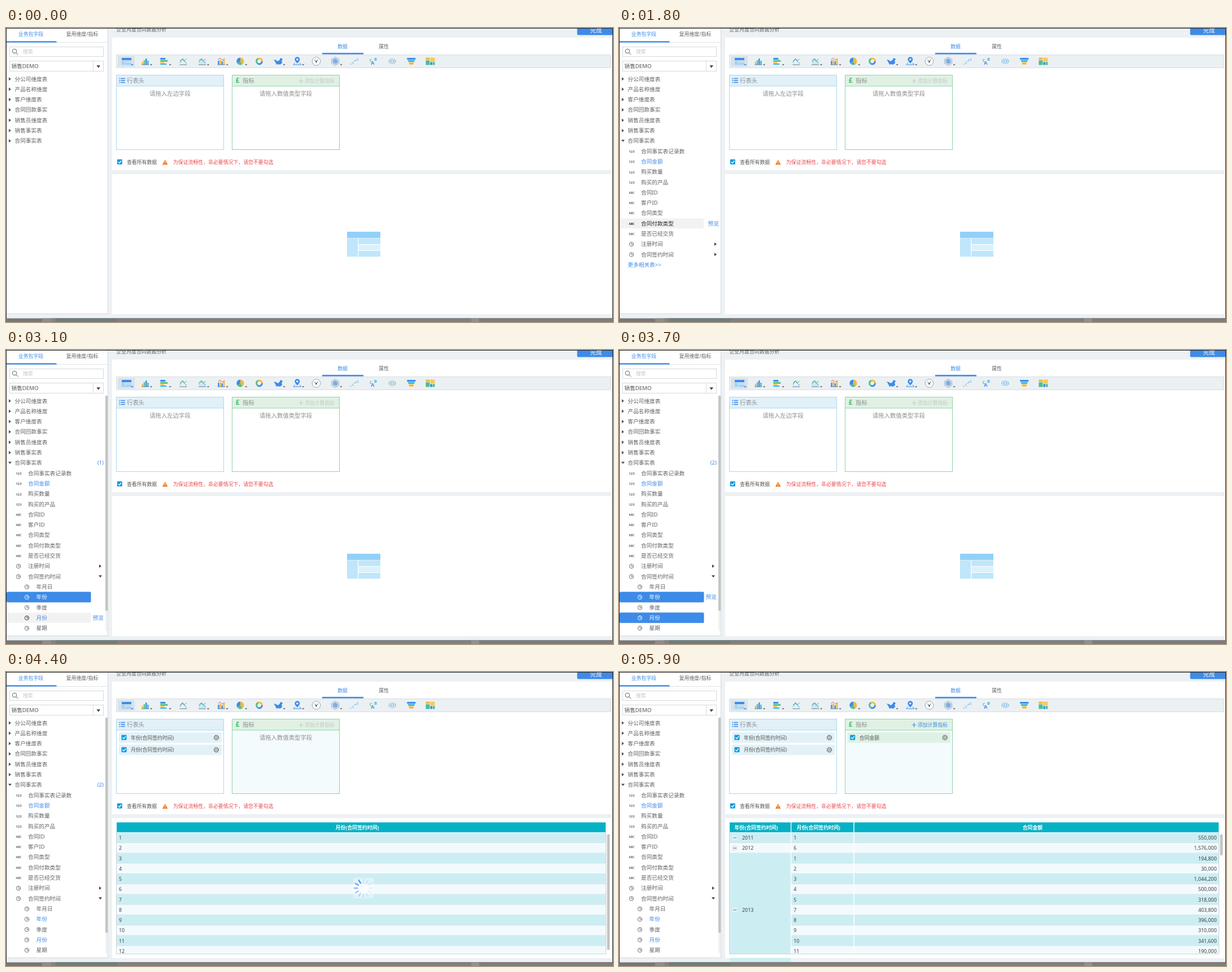
An HTML page for the animation above (7700 ms loop, 1075 by 521 pixels).

```html
<!DOCTYPE html>
<html>
<head>
<meta charset="utf-8">
<title>Report builder</title>
<style>
html, body { margin: 0; width: 100%; height: 100%; overflow: hidden; background: #edf1f4; }
svg { display: block; width: 100%; height: 100%; font-family: "Noto Sans", "Noto Sans CJK SC", sans-serif; }
text { white-space: pre; }
</style>
</head>
<body>
<svg id="stage" viewBox="0 0 1075 521">
  <g id="base"></g>
  <g id="live"></g>
  <g id="edge"></g>
</svg>
<script>
const LOOP = 7700, STEP = 100;
const BLUE = '#3d8be8', GREY = '#606266', DARK = '#262626', TEAL = '#05b1c5';
const SMALL = 8.9, MID = 9.66, BIG = 10.4;

// Drawing helpers: each returns SVG markup; text is centred vertically on y.
const rect = (x, y, w, h, fill, extra = '') =>
  `<rect x="${x}" y="${y}" width="${w}" height="${h}" fill="${fill}" ${extra}/>`;
const frame = (x, y, w, h, color, fill = 'none', extra = '') =>
  rect(x + .5, y + .5, w - 1, h - 1, fill, `stroke="${color}" ${extra}`);
const fillPath = (d, fill) => `<path d="${d}" fill="${fill}"/>`;
const line = (d, color, w = 1, extra = '') =>
  `<path d="${d}" fill="none" stroke="${color}" stroke-width="${w}" ${extra}/>`;
const disc = (x, y, r, fill, extra = '') => `<circle cx="${x}" cy="${y}" r="${r}" fill="${fill}" ${extra}/>`;
const text = (s, x, y, size, fill, anchor = 'start', weight = 400) =>
  `<text x="${x}" y="${y + size * .37}" font-size="${size}" fill="${fill}" text-anchor="${anchor}" font-weight="${weight}">${s}</text>`;
const move = (x, y, body) => `<g transform="translate(${x} ${y})">${body}</g>`;
const rightArrow = (x, y, c) => fillPath(`M${x - 2} ${y - 3}l4 3l-4 3z`, c);
const downArrow = (x, y, c) => fillPath(`M${x - 3} ${y - 2}h6l-3 4z`, c);
const check = (x, y) => rect(x - 4.5, y - 4.5, 9, 9, '#0a9be0', 'rx="1"') +
  line(`M${x - 2.5} ${y}l2 2.2l3.5 -4.3`, '#fff', 1.4);
const clock = (x, y, c) => disc(x, y, 3.7, 'none', `stroke="${c}" stroke-width=".9"`) +
  line(`M${x} ${y - 2.6}v2.8h2.8`, c, .9);
const gear = (x, y) => disc(x, y, 4.1, 'none', 'stroke="#6d7377" stroke-width="1.3" stroke-dasharray="2.1 1.1"') +
  disc(x, y, 3.4, 'none', 'stroke="#6d7377" stroke-width=".8"') +
  disc(x, y, 1.5, 'none', 'stroke="#6d7377" stroke-width=".9"');

const bars = (hs, colors) => hs.map((h, i) => rect(-6 + i * 3.2, 6 - h, 2.4, h, colors[i % colors.length])).join('');
const wedge = (a, b, color) => {
  const p = k => `${6.5 * Math.cos(k)} ${6.5 * Math.sin(k)}`;
  return fillPath(`M0 0L${p(a)}A6.5 6.5 0 ${b - a > Math.PI ? 1 : 0} 1 ${p(b)}z`, color);
};
const hexagon = r => 'M' + [0, 1, 2, 3, 4, 5].map(i =>
  `${r * Math.sin(i * Math.PI / 3)} ${-r * Math.cos(i * Math.PI / 3)}`).join('L') + 'z';
const axis = line('M-6.5 6h13', '#5d7f9c');

function icons() {
  const GREEN = '#4fbf8b', YEL = '#f5b83d', CYAN = '#35b6e6';
  const ring = (c, from) => disc(0, 0, 4.9, 'none',
    `stroke="${c}" stroke-width="3" stroke-dasharray="10.3 20.5" stroke-dashoffset="${-from}"`);
  const dots = (n, c, f) => Array.from({ length: n }, (_, i) => disc(...f(i), .8, c)).join('');
  return [
    rect(-8, -6, 17, 4, BLUE) + rect(-8, -1.3, 5, 7.5, '#9fd3f6') + rect(-2.2, -1.3, 11.2, 3.3, '#b5def8') +
      rect(-2.2, 2.8, 11.2, 3.4, '#9fd3f6'),
    bars([5, 8, 11, 7], [YEL, GREEN, BLUE, CYAN]) + axis,
    rect(-7, -6, 9, 3, BLUE) + rect(-7, -2.2, 13, 3, GREEN) + rect(-7, 1.6, 7, 2, YEL) + rect(-7, 4, 11, 2, CYAN),
    line('M-6 3L-1 -5L2 -1L6 -4', GREEN) + line('M-6 0L-2 -4L3 1L6 4', BLUE) + axis,
    fillPath('M-6 6V2L-1 -5L2 -1L6 -4V6z', '#cfe9ee') + line('M-6 2L-1 -5L2 -1L6 -4', GREEN) +
      line('M-6 -1L-2 -4L3 1L6 3', BLUE) + axis,
    bars([7, 9, 6, 10], [BLUE, YEL]) + line('M-6 -3L-2 -6L2 -2L6 -5', '#e2605d') + axis,
    wedge(-1.57, 1, YEL) + wedge(1, 2.6, GREEN) + wedge(2.6, 4.71, BLUE),
    ring(BLUE, 0) + ring(GREEN, 10.3) + ring(YEL, 20.5),
    fillPath('M-8 -3L-4 -2L-1 0L2 -2L4 -6L8 -4L6 -1L7 3L3 6L0 5L-3 6L-5 2z', BLUE),
    fillPath('M0 4C-2 1 -4.5 -1 -4.5 -3.3A4.5 4.5 0 0 1 4.5 -3.3C4.5 -1 2 1 0 4z', BLUE) + disc(0, -3.2, 1.8, '#fff') +
      line('M-4 2.5L-7 6H7L4 2.5', BLUE),
    disc(0, 0, 7.3, '#fff', 'stroke="#9aa3a9"') + line('M-3 -3L0 1L3 -3', '#555', 1) + disc(0, 1, 1.4, '#555'),
    fillPath(hexagon(7.5), '#dbe6ee') + line(hexagon(7.5) + hexagon(4.8), '#8fa6b8', .8) +
      fillPath('M0 -5L4 -1L3 4L-3 3L-4 -2z', '#76aeea'),
    dots(4, BLUE, i => [-6 + i * 4.2, 5 - i * 3 + (i % 2) * 2]) + dots(4, CYAN, i => [-3 + i * 3, 2 - i * 2.2]),
    text('C', -4.5, -1.5, 7, GREEN, 'middle', 700) + text('A', -1, 3, 9, BLUE, 'middle', 700) + text('B', 4, -3.5, 7.5, CYAN, 'middle', 700),
    dots(12, '#45a9b0', i => [6 * Math.cos(i * .524), 4 * Math.sin(i * .524)]) +
      dots(6, BLUE, i => [3 * Math.cos(i * 1.05), 1.8 * Math.sin(i * 1.05)]),
    rect(-7.5, -6, 15, 3, BLUE) + fillPath('M-6.5 -2.2h13l-1.5 3.2h-10z', CYAN) + fillPath('M-4.5 1.8h9l-1 4h-7z', YEL),
    rect(-8, -6.5, 7, 4, YEL) + rect(-8, -1.7, 7, 8.2, GREEN) + rect(0, -6.5, 8, 7, '#f7c95b') + rect(0, 1.3, 3.5, 5.2, BLUE) +
      rect(4.3, 1.3, 3.7, 5.2, GREEN)
  ].map((body, i) => move(213 + 33.65 * i, 59, body) +
    ([0, 1, 2, 4, 5, 6, 8, 9, 11].includes(i) ? fillPath(`M${221.2 + 33.65 * i} 64h4.4l-2.2 2.8z`, i ? '#777' : BLUE) : '')).join('');
}

function drawBase() {
  return rect(0, 0, 1075, 521, '#edf1f4') +
    rect(0, 0, 180, 506, '#fff') + line('M180.5 0V506.5H0', '#d5d9dd') +
    text('业务包字段', 44, 11, SMALL, BLUE, 'middle') + text('复用维度/指标', 135, 11, SMALL, GREY, 'middle') +
    line('M0 25.5H180', '#dfe3e6') + rect(0, 23.3, 89.5, 2.4, BLUE) +
    frame(6, 33, 167, 18, '#d5d8db', '#fff') + disc(15, 41, 3.8, 'none', 'stroke="#666"') + line('M17.8 43.8l3.6 3.6', '#666') +
    text('搜索', 30, 42, SMALL, '#c4c6c8') +
    frame(6, 58, 167, 19, '#d5d8db', '#fff') + line('M154.5 58V77', '#d5d8db') +
    text('销售DEMO', 9.5, 67.7, MID, '#555') + fillPath('M160.3 66.2h6.8l-3.4 4.6z', '#444') +
    text('企业月度合同数据分析', 195.5, 3, SMALL, GREY) +
    rect(1011.5, -5, 70, 17.5, BLUE, 'rx="2"') + text('完成', 1045, 4, BIG, '#fff', 'middle') +
    rect(188, 17, 885, 235, '#fff') + rect(188, 259, 885, 248, '#fff') +
    text('数据', 596, 32.5, SMALL, BLUE, 'middle') + text('属性', 669, 32.5, SMALL, GREY, 'middle') +
    rect(560, 44, 73, 2.6, BLUE) +
    frame(195, 47, 876, 24, '#d6dee3', '#ebf0f3') + rect(198, 49.5, 30, 19, '#d9e2e7') + icons() +
    frame(195, 83, 191, 133, '#a9d8ee', '#fff') + rect(196, 84, 189, 19, '#e2f0f8') + line('M195 103H386', '#a9d8ee') +
    [-3.5, 0, 3.5].map(d => rect(200.5, 92.2 + d, 1.8, 1.7, BLUE) + rect(203.5, 92.2 + d, 7.3, 1.6, BLUE)).join('') +
    text('行表头', 214, 93, BIG, '#8a8f93') +
    check(201.3, 237.3) + text('查看所有数据', 214, 237.5, SMALL, '#555') +
    fillPath('M281.7 233.5L286.6 242.3H276.8z', '#f07c1a') + rect(281.2, 236.5, 1, 3, '#fff') + rect(281.2, 240.2, 1, 1, '#fff') +
    text('为保证流畅性，非必要情况下，请您不要勾选', 296, 237.5, SMALL, '#ea4b50');
}

function drawEdge() {
  const parts = [[0, '#777'], [64, '#8d8d8d'], [80, '#878182'], [88, '#6f7d7d'], [197, '#808080'], [824, '#919191'], [838, '#7d7d7d']];
  return parts.map(([x, c]) => rect(x, 514.5, 1075 - x, 7, c)).join('') +
    rect(0, 0, 1075, 1, '#222') + rect(0, 0, 1, 515, '#222') + rect(1074, 0, 1, 515, '#222');
}

// Timelines: the last entry at or before t holds.
const at = (list, t) => list.reduce((v, [from, x]) => t >= from ? x : v, undefined);
const HOVER = [[0, -1], [800, 6], [1400, 7], [1500, 10], [1600, 12], [1700, 13], [1800, 14], [1900, 16], [2000, 17],
  [2600, 18], [2700, 19], [3100, 21], [3600, 20], [3700, 19], [4000, -1], [4700, 8], [5100, -1]];
const COUNT = [[0, ''], [2900, '(1)'], [3400, '(2)'], [4500, ''], [5100, '(1)'], [5800, '']];
const DRAG_ROWS = [[4000, [95, 425]], [4100, [225, 290]], [4200, [343, 162]], [4300, [337, 150]]];
const DRAG_SUM = [[5100, [150, 232]], [5200, [388, 214]], [5300, [444, 190]], [5400, [449, 178]], [5500, [454, 166]],
  [5600, [457, 153]], [5700, [458, 147]]];
const SELECTED = { 8: [5100, 5800], 19: [2900, 4400], 21: [3400, 4400] };

const TABLES = ['分公司维度表', '产品名称维度', '客户维度表', '合同回款事实', '销售员维度表', '销售事实表', '合同事实表'];
const FIELDS = ['合同事实表记录数', '合同金额', '购买数量', '购买的产品', '合同ID', '客户ID', '合同类型', '合同付款类型',
  '是否已经交货', '注册时间', '合同签约时间'];
const PARTS = ['年月日', '年份', '季度', '月份', '星期'];
const rowY = i => 90.2 + 18.3 * i;

function tooltip(s, x, y, w) {
  return rect(x, y, w, 15.5, '#fdf6d3', 'rx="2"') + text(s, x + 9, y + 7.5, SMALL, '#777');
}

function tree(t) {
  const open = t >= 1200, deep = t >= 2300, hover = at(HOVER, t);
  const right = deep ? 176 : 180;
  const rows = [...TABLES, ...(open ? FIELDS : []), ...(deep ? PARTS : [])];
  let out = '';
  rows.forEach((label, i) => {
    const y = rowY(i), hot = i === hover, span = SELECTED[i];
    const picked = span && t >= span[0] && t < span[1];
    const wide = i < 7 || i === 16 || i === 17;
    const ink = picked ? '#fff' : hot ? DARK : GREY;
    if (picked) out += rect(1, y - 9.3, 149.5, 18.6, BLUE, 'rx="2"');
    else if (hot) out += rect(1, y - 9, wide ? right - 1 : 149, 18, '#f2f2f2');
    if (hot && !wide) out += text('预览', deep ? 153.5 : 157.5, y - .3, MID, BLUE);
    if (i < 7) out += (i === 6 && open ? downArrow : rightArrow)(7, y, hot ? '#111' : '#555');
    else if (i < 11) out += text('123', 22.5, y + .5, 5.8, ink, 'middle', 700);
    else if (i < 16) out += text('ABC', 22.5, y + .3, 4.9, ink, 'middle', 700);
    else out += clock(i < 18 ? 22 : 37, y + .2, ink);
    if (i === 16 || i === 17) out += (i === 17 && deep ? downArrow : rightArrow)(deep ? 167 : 171, y, '#444');
    const linked = span && !picked;
    out += text(label, i < 7 ? 15.5 : i < 18 ? 39 : 53.5, y - .2, MID, linked ? BLUE : ink);
  });
  if (open && !deep) out += text('更多相关表&gt;&gt;', 15.5, rowY(18), MID, BLUE);
  if (deep) out += rect(176, 81, 4.3, 417, '#f1f1f1') + rect(176, 81, 4.3, 381, '#c4c4c4', 'rx="1"');
  out += text(at(COUNT, t), 173, rowY(6) - .2, MID, BLUE, 'end');
  if (t >= 1300 && t < 1500) out += tooltip('销售DEMO.合同事实表', 97, 212, 108);
  if (t >= 2400 && t < 2700) out += tooltip('销售DEMO.合同事实表.合同签约时间', 109, 414.7, 163);
  return out;
}

const chip = (label, x, y, fill) => rect(x, y - 9.3, 182, 18.6, fill, 'rx="2"') + check(x + 9, y - .3) +
  text(label, x + 21, y, SMALL, '#555') + gear(x + 172.5, y);
const slot = (x, color) => frame(x, 107, 183, 20, color, 'none', 'stroke-dasharray="2.5 1.5"');

function zones(t) {
  const done = t >= 5800, add = done ? BLUE : '#c3c9c5';
  let out = frame(400, 83, 191, 133, '#8fd3a8', t >= 4000 ? '#f4fbfd' : '#fff') + rect(401, 84, 189, 19, '#e0f1e4') +
    line('M400 103H591', '#8fd3a8') + text('£', 410, 93, 11.5, '#45bd72', 'middle', 700) + text('指标', 419, 93, BIG, '#8a8f8c') +
    line('M518.5 94h8M522.5 90v8', add, 1.2) + text('添加计算指标', 529, 93.3, SMALL, add);
  if (t < 4200) out += text('请拖入左边字段', 290.5, 116, BIG, '#8c8c8c', 'middle');
  else if (t < 4400) out += slot(199, '#7cc0e6');
  else out += chip('年份(合同签约时间)', 200, 116.3, '#e3f1f7') + chip('月份(合同签约时间)', 200, 138, '#e3f1f7');
  if (t < 5300) out += text('请拖入数值类型字段', 495.5, 116, BIG, '#8c8c8c', 'middle');
  else if (!done) out += slot(404, '#6cc88c');
  else out += chip('合同金额', 404.7, 116.3, '#dff1e4');
  return out;
}

const MONTHS = [1, 6, 1, 2, 3, 4, 5, 7, 8, 9, 10, 11];
const SUMS = [550000, 1576000, 194800, 30000, 1044200, 500000, 318000, 403800, 396000, 310000, 341600, 190000];
const commas = n => String(n).replace(/\B(?=(\d{3})+$)/g, ',');
const lineY = i => 284.7 + 18.25 * i;
const tone = i => i % 2 ? '#f3fafd' : '#cceef3';

function column(title, x, end, cells, alignRight) {
  let out = rect(x, 266.5, end - x, 17.5, TEAL) + text(title, (x + end) / 2 - 7, 275.3, SMALL, '#fff', 'middle', 700);
  cells.forEach((s, i) => {
    out += rect(x, lineY(i), end - x, 18.25, tone(i)) + rect(x, lineY(i + 1) - .7, end - x, .8, '#d3dadc') +
      text(s, alignRight ? end - 3.5 : x + 4, lineY(i) + 9.2, SMALL, '#404040', alignRight ? 'end' : 'start');
  });
  return out;
}

function years() {
  let out = column('年份(合同签约时间)', 196, 304, ['', '']) + rect(196, lineY(2), 108, 200, tone(0));
  [[2011, 0], [2012, 1], [2013, 7]].forEach(([year, i]) => {
    const y = lineY(i) + 9.2;
    out += rect(200.5, y - 4.5, 9, 9, '#e2eef0', 'rx="1.5"') + line(`M202.3 ${y}h5.6`, '#777') + text(year, 218, y, SMALL, '#404040');
  });
  return out;
}

function spinner(turn) {
  let out = '';
  for (let i = 0; i < 12; i++) {
    out += `<g transform="rotate(${(turn - i) * 30})" opacity="${Math.max(.12, 1 - i * .16)}">` +
      rect(-1, -17.3, 2, 8, BLUE, 'rx="1"') + '</g>';
  }
  return move(633, 383, rect(-18, -18, 36, 36, '#fff', 'opacity=".35"') + out);
}

function placeholder() {
  return rect(604, 361, 59, 11.3, '#93d0f8') + rect(604, 373, 19, 32.3, '#bfe6fb') + rect(624.3, 373, 38.7, 10, '#bfe6fb') +
    rect(624.3, 384, 38.7, 10, '#d9f2fd') + rect(624.3, 395, 38.7, 10.3, '#bfe6fb');
}

function table(t) {
  if (t < 4400) return placeholder();
  const loaded = t >= 4500;
  let out = '';
  if (!loaded) out += column('月份(合同签约时间)', 196, 1062, MONTHS.map((_, i) => i + 1));
  else {
    out += years() + column('月份(合同签约时间)', 305.3, t < 5900 ? 1062 : 415.3, MONTHS);
    if (t >= 5900) out += column('合同金额', 416.8, 1062, SUMS.map(commas), true);
  }
  out += rect(190, 500, 880, 6.5, '#fff') + line('M195.5 284V499.7H1062.5V284', '#c9d3d6');
  out += rect(1064.5, 287.5, 4.6, loaded ? 37.5 : 205, '#c2c2c2', 'rx="2"');
  if (!loaded || (t >= 5800 && t < 5900)) out += spinner(11);
  return out;
}

function dragged(t) {
  const rows = t >= 4000 && t < 4400, sum = t >= 5100 && t < 5800;
  if (!rows && !sum) return '';
  const [x, y] = at(rows ? DRAG_ROWS : DRAG_SUM, t), w = rows ? 57 : 45;
  return rect(x, y, w, 14.7, BLUE, 'opacity=".75"') + text(rows ? '共2个字段' : '合同金额', x + w / 2, y + 7.4, MID, '#fff', 'middle');
}

const $ = id => document.getElementById(id);
$('base').innerHTML = drawBase();
$('edge').innerHTML = drawEdge();

const start = performance.now();
let shown = -1;
function tick() {
  const t = Math.floor((performance.now() - start) % LOOP / STEP) * STEP;
  if (t !== shown) {
    shown = t;
    $('live').innerHTML = tree(t) + zones(t) + table(t) + dragged(t);
  }
  requestAnimationFrame(tick);
}
tick();
</script>
</body>
</html>
```
